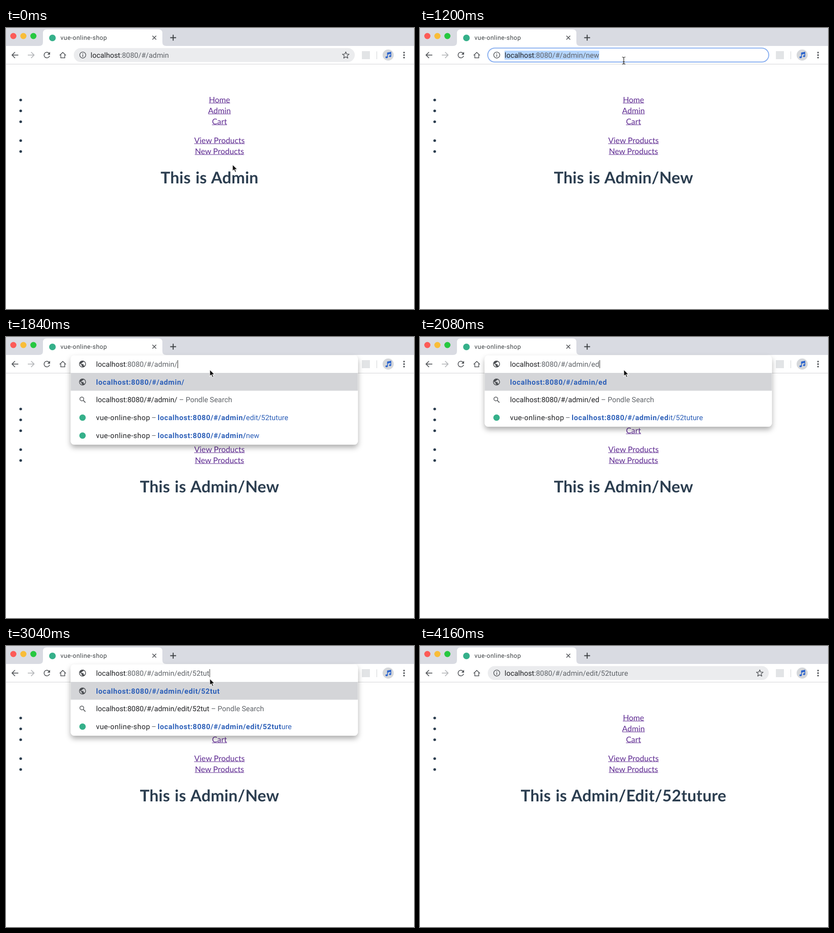
Recreate the animation shown at these times as an HTML page. Size 861x595 px, loop 4660 ms.

```html
<!DOCTYPE html>
<html lang="en">
<head>
<meta charset="utf-8">
<title>vue-online-shop</title>
<style>
  html, body { margin: 0; width: 100%; height: 100%; overflow: hidden; background: #fff; }
  svg { display: block; }
  text { font-family: Roboto, sans-serif; font-size: 15.3px; fill: #202124; white-space: pre; text-rendering: geometricPrecision; }
  .tab { font-size: 13px; letter-spacing: .47px; fill: #3c4043; }
  .name { letter-spacing: .47px; }
  .dim { fill: #5f6368; }
  .blue { fill: #2c5fb8; }
  .bold { font-weight: 700; letter-spacing: .65px; }
  .status { font-size: 13.2px; fill: #5f6368; }
  .link { font-family: Lato, sans-serif; font-size: 16.8px; fill: #5f2b92; text-anchor: middle; }
  .head { font-family: Lato, sans-serif; font-size: 34px; font-weight: 700; letter-spacing: .2px; word-spacing: 1.6px; fill: #2c3e50; text-anchor: middle; }
  .line { fill: none; stroke: #55585c; stroke-width: 1.7; }
</style>
</head>
<body>
<svg width="861" height="595" viewBox="0 0 861 595">
  <defs>
    <filter id="shade" x="-10%" y="-10%" width="120%" height="130%">
      <feDropShadow dx="0" dy="6" stdDeviation="6" flood-color="#000" flood-opacity=".32"/>
    </filter>
    <path id="globe" transform="scale(.72) translate(-12 -12)" fill="#4b4e52" d="M12 2C6.48 2 2 6.48 2 12s4.48 10 10 10 10-4.48 10-10S17.52 2 12 2zm-1 17.93c-3.95-.49-7-3.85-7-7.93 0-.62.08-1.21.21-1.79L9 15v1c0 1.1.9 2 2 2v1.93zm6.9-2.54c-.26-.81-1-1.39-1.9-1.39h-1v-3c0-.55-.45-1-1-1H8v-2h2c.55 0 1-.45 1-1V7h2c1.1 0 2-.9 2-2v-.41c2.93 1.19 5 4.06 5 7.41 0 2.08-.8 3.97-2.1 5.39z"/>
    <path id="arrow" d="M0 0V14.2L3.3 11.2 5.6 16.4 8 15.4 5.8 10.3H10.4Z" fill="#111" stroke="#fff" stroke-width="1.1"/>
    <path id="hand" transform="translate(-5.5 0)" d="M4 1.5c0-2 3-2 3 0V7c.3-1.3 2.6-1.2 2.8.2.5-1 2.4-.8 2.6.6.7-.8 2.3-.5 2.3 1.2 0 3.5-.3 5-1.5 6.5V18H6.5v-1.5C5 15 2.6 12 1 9.8c-1-1.6 1-2.6 2.2-1.2L4 9.6zM8 11v4M10 11v4M12 11v4" fill="#fff" stroke="#111" stroke-width="1.1"/>
    <path id="beam" d="M-3.5 -7.5Q0 -7.5 0 -5.5Q0 -7.5 3.5 -7.5M0 -6V6M-3.5 7.5Q0 7.5 0 5.5Q0 7.5 3.5 7.5M-2 2.5H2" fill="none" stroke="#222" stroke-width="1.2"/>
  </defs>

  <rect width="861" height="595" fill="#fff"/>
  <rect width="861" height="38" fill="#d9dbe2"/>
  <circle cx="15.5" cy="17" r="6.5" fill="#fc5b57"/>
  <circle cx="36.7" cy="17" r="6.5" fill="#f9bd38"/>
  <circle cx="57.8" cy="17" r="6.5" fill="#27c840"/>
  <path d="M70 38q8 0 8-8V11q0-8 8-8H322q8 0 8 8V30q0 8 8 8Z" fill="#fff"/>
  <circle cx="98" cy="21" r="7" fill="#35b08a"/>
  <text class="tab" x="115" y="25">vue-online-shop</text>
  <path class="line" d="M309 16.5l8 8m0-8l-8 8"/>
  <path class="line" style="stroke:#3c4043;stroke-width:2" d="M346.5 20.5h12.5m-6.25-6.25v12.5"/>
  <path d="M0 76.5H861" stroke="#d3d4d6"/>
  <path class="line" d="M26 57.3H13M19 51l-6.3 6.3L19 63.6"/>
  <path class="line" style="stroke:#b5b7ba" d="M46 57.3H59M53 51l6.3 6.3L53 63.6"/>
  <path transform="translate(86.3 57.3) scale(.84) translate(-12 -12)" fill="#55585c" d="M17.65 6.35A7.95 7.95 0 0 0 12 4a8 8 0 1 0 7.73 10h-2.08A6 6 0 1 1 12 6c1.66 0 3.14.69 4.22 1.78L13 11h7V4z"/>
  <path class="line" style="stroke-width:1.5" d="M113.2 58l6.6-6.4 6.6 6.4M115.6 56.5V63.2H124V56.5"/>
  <rect x="751" y="49" width="17" height="17" fill="#e2e4e6"/>
  <path d="M782.5 49.5V66" stroke="#cfd1d4"/>
  <circle cx="806.5" cy="57.3" r="11.7" fill="#d5d7da"/>
  <path d="M804.2 62V52L813 50.3V59.5H811.4V55L805.8 56.2V62Z" fill="#2f66cc"/>
  <ellipse cx="803.2" cy="62" rx="2.6" ry="2.1" fill="#2f66cc"/>
  <ellipse cx="810.6" cy="59.7" rx="2.4" ry="1.9" fill="#2f66cc"/>
  <g fill="#55585c"><circle cx="840" cy="52" r="1.8"/><circle cx="840" cy="57.4" r="1.8"/><circle cx="840" cy="62.8" r="1.8"/></g>

  <g id="page"></g>
  <text id="heading" class="head" x="429.4" y="328.5"></text>
  <g id="bar"></g>
  <g id="status"></g>
  <use id="cursor"/>
</svg>
<script>
const LOOP = 4660, STEP = 80;
const HOST = 'localhost', ROOT = ':8080/#/';
const EDIT = 'admin/edit/52tuture', NEW = 'admin/new';
const byId = id => document.getElementById(id);
const pen = document.createElement('canvas').getContext('2d');
const widthOf = (text, font) => { pen.font = font; return pen.measureText(text).width; };
const at = (steps, t) => steps.filter(s => s[0] <= t).pop();

const links = [
  ['Home', 152.5, ''], ['Admin', 175.5, 'admin'], ['Cart', 198.5, 'cart'],
  ['View Products', 238.5, 'admin'], ['New Products', 261.5, NEW]
].map(([label, y, path]) => ({ label, y, path, half: widthOf(label, '16.8px Lato, sans-serif') / 2 }));

// time, path, mode
const fieldSteps = [
  [0, 'admin', 'idle'], [400, NEW, 'idle'], [1120, NEW, 'select'], [1360, NEW, 'caret'],
  [1600, 'admin/', 'list'], [1920, 'admin/e', 'list'], [2080, 'admin/ed', 'list'],
  [2320, 'admin/edi', 'list'], [2400, 'admin/edit', 'list'], [2560, 'admin/edit/', 'list'],
  [2720, 'admin/edit/5', 'list'], [2800, 'admin/edit/52', 'list'], [2880, 'admin/edit/52t', 'list'],
  [2960, 'admin/edit/52tu', 'list'], [3040, 'admin/edit/52tut', 'list'],
  [3120, 'admin/edit/52tutu', 'list'], [3200, EDIT, 'list'], [3280, EDIT, 'idle']
];
const headSteps = [[0, 'This is Admin'], [400, 'This is Admin/New'], [3280, 'This is Admin/Edit/52tuture']];
const fadeSteps = [[0, .16], [1680, .6], [1760, 1]];
// time, x, y of the pointer's hot spot
const route = [[0, 478, 289], [160, 474, 283], [320, 462, 261], [480, 460, 258],
  [640, 457, 205], [800, 453, 141], [960, 440, 88], [1040, 430, 69], [LOOP, 430, 69]];
const HIDE_AT = 3520;

const useIcon = (id, x, y) => `<use href="#${id}" x="${x}" y="${y}"/>`;
const text = (x, y, body, cls = '') => `<text x="${x}" y="${y}" class="${cls}">${body}</text>`;
const span = (cls, body) => `<tspan class="${cls}">${body}</tspan>`;
const dot = y => `<circle cx="161.5" cy="${y}" r="6.8" fill="#35b08a"/>`;

const star = Array.from({ length: 10 }, (_, i) => {
  const r = i % 2 ? 3.3 : 7.4, a = i * Math.PI / 5;
  return `${717 + r * Math.sin(a)},${57.8 - r * Math.cos(a)}`;
}).join(' ');

byId('page').innerHTML = links.map(l =>
  `<circle cx="31" cy="${l.y}" r="2.8" fill="#2c3e50"/>` +
  text(450.5, l.y + 5, l.label, 'link') +
  `<path d="M${450.5 - l.half} ${l.y + 6.5}h${2 * l.half}" stroke="#5f2b92"/>`).join('');

function pointer(t) {
  const i = Math.max(1, route.findIndex(p => p[0] > t));
  const [a, b] = [route[i - 1], route[i]];
  const k = (t - a[0]) / (b[0] - a[0]);
  return { x: a[1] + (b[1] - a[1]) * k, y: a[2] + (b[2] - a[2]) * k };
}

function field(path, mode) {
  const listed = mode === 'list', x = listed ? 190 : 178.5;
  const wide = widthOf(HOST + ROOT + path, '15.3px Roboto, sans-serif');
  let out = '';
  if (mode === 'idle') {
    out += '<rect x="143" y="42.5" width="593" height="29.5" rx="14.75" fill="#ebecee"/>';
  } else if (!listed) {
    out += '<rect x="143" y="42.5" width="593" height="29.5" rx="14.75" fill="#fff" stroke="#8ab0f0" stroke-width="2"/>';
  }
  if (mode === 'select') out += `<rect x="${x}" y="48" width="${wide}" height="19" fill="#b4d5fe"/>`;
  if (listed) {
    out += useIcon('globe', 161.5, 57.3);
  } else {
    out += '<circle class="line" cx="162" cy="57.3" r="6.4" style="stroke-width:1.4"/>' +
      '<path class="line" style="stroke-width:1.5" d="M162 56.5V61M162 53.6V55.2"/>';
  }
  if (mode === 'idle') out += `<polygon class="line" style="stroke-width:1.4;stroke-linejoin:round" points="${star}"/>`;
  out += text(x, 62.8, HOST + span('dim', ROOT + path));
  if (listed || mode === 'caret') out += `<path d="M${x + wide + 1} 49V66" stroke="#222"/>`;
  return out;
}

function suggestions(path, alpha) {
  const url = HOST + ROOT;
  const matches = [EDIT, NEW].filter(p => p.startsWith(path));
  const height = 75 + 38 * (matches.length + 1);
  const rows = matches.map((p, i) => {
    const y = 170.7 + 38 * i;
    return dot(y) + text(190, y + 5.3, 'vue-online-shop', 'name') + text(307, y + 5.3, '–', 'dim') +
      text(320, y + 5.3, span('bold', url + path) + p.slice(path.length), 'blue');
  }).join('');
  return `<g opacity="${alpha}">
    <rect x="136.5" y="39" width="606" height="${height}" rx="8" fill="#fff" filter="url(#shade)"/>
    <rect x="136.5" y="76" width="606" height="37.7" fill="#d4d5d8"/>
    ${useIcon('globe', 161.5, 95.3)}${text(190, 100.6, url + path, 'blue bold')}
    <circle class="line" cx="160" cy="131.2" r="4" style="stroke-width:1.5"/>
    <path class="line" d="M163 134.2l4.6 4.6"/>
    ${text(190, 138.3, url + path + span('dim', ' – Pondle Search'))}${rows}</g>
    <rect x="136.5" y="39" width="606" height="37" rx="8" fill="#fff"/>`;
}

function bubble(path) {
  const label = HOST + ROOT + path;
  const w = widthOf(label, '13.2px Roboto, sans-serif') + 8;
  return `<path d="M-1 575.5H${w - 4}q4 0 4 4V596H-1Z" fill="#f4f4f5" stroke="#b4b5b8"/>` +
    text(1, 591, label, 'status');
}

function draw(t) {
  const [, path, mode] = at(fieldSteps, t);
  const { x, y } = pointer(t);
  const over = links.find(l => Math.abs(y - l.y) < 12 && Math.abs(x - 450.5) < l.half);
  const inField = y > 42 && y < 73 && mode !== 'list';

  byId('heading').textContent = at(headSteps, t)[1];
  byId('bar').innerHTML = (mode === 'list' ? suggestions(path, at(fadeSteps, t)[1]) : '') + field(path, mode);
  byId('status').innerHTML = over ? bubble(over.path) : '';

  const cursor = byId('cursor');
  cursor.setAttribute('href', over ? '#hand' : inField ? '#beam' : '#arrow');
  cursor.setAttribute('x', x);
  cursor.setAttribute('y', y);
  cursor.style.display = t < HIDE_AT ? '' : 'none';
}

const start = performance.now();
let shown = -1;
function tick() {
  const t = Math.floor((performance.now() - start) % LOOP / STEP) * STEP;
  if (t !== shown) draw(shown = t);
  requestAnimationFrame(tick);
}
tick();
</script>
</body>
</html>
```
